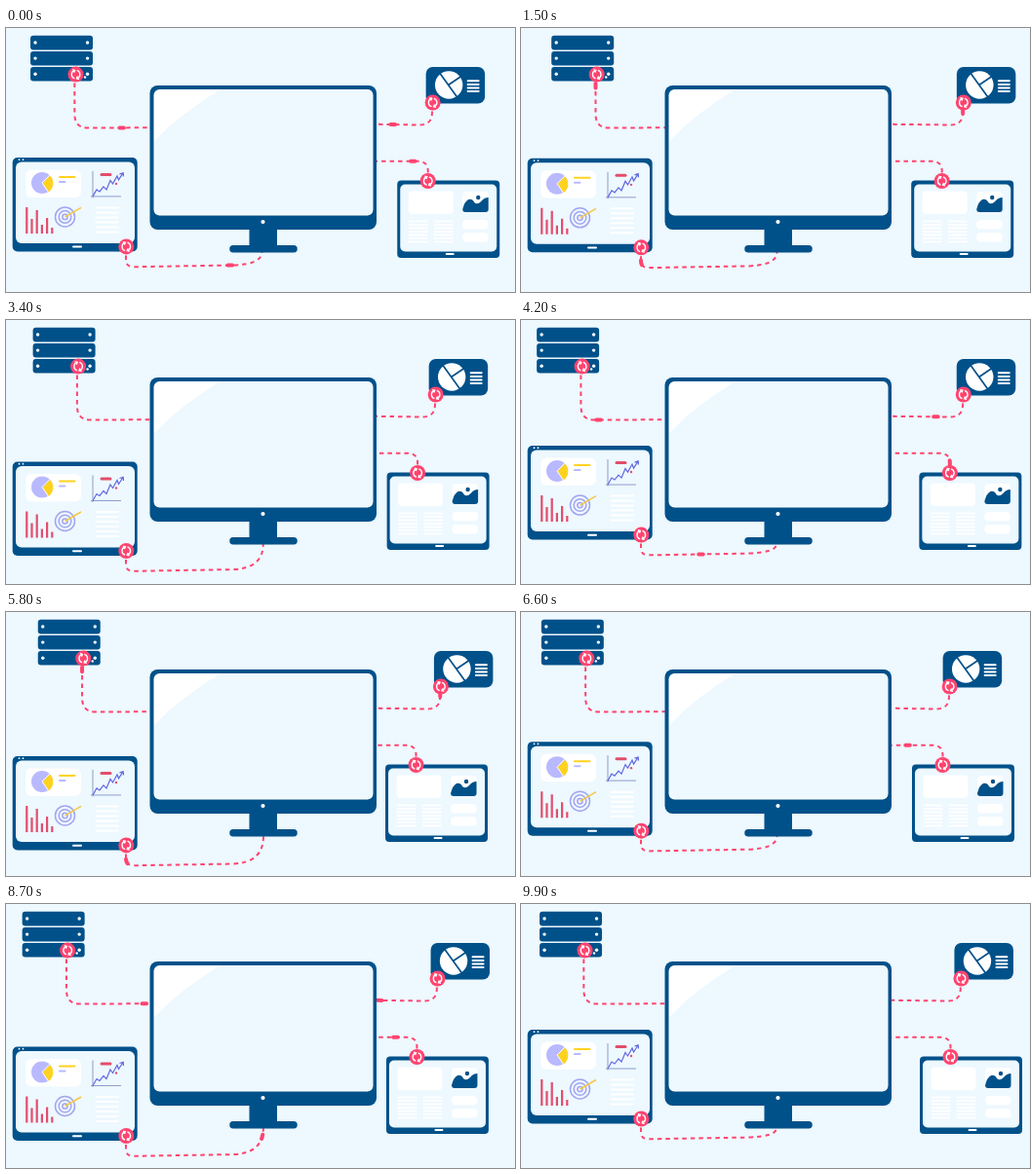
An HTML page for the animation above (10000 ms loop, 522x271 px).

```html
<!DOCTYPE html>
<html lang="en">
<head>
<meta charset="utf-8">
<title>Connected devices</title>
<style>
  html, body { margin: 0; width: 100%; height: 100%; overflow: hidden; background: #edf8ff; }
  svg { display: block; width: 522px; height: 271px; }
  .navy { fill: #00518a; }
  .pale { fill: #edf8ff; }
  .white { fill: #fff; }
  .stroke { fill: none; stroke: #fff; stroke-width: 2; stroke-linecap: round; }
  .wire { fill: none; stroke: #ff4470; stroke-width: 2; stroke-dasharray: 4.5 4; }
  .pulse { fill: none; stroke: #ff4470; stroke-width: 4; stroke-linecap: round; stroke-dasharray: 4.5 999; }
</style>
</head>
<body>
<svg viewBox="0 0 522 271">
  <defs>
    <g id="sync">
      <circle r="8" fill="#ff4470"/>
      <g fill="none" stroke="#fff" stroke-width="1.3">
        <path id="half" d="M-1.2 4.2A4.4 4.4 0 0 1 -1.5 -4.1M-3.4 -4.9L-.9 -4.2L-1.8 -1.9"/>
        <use href="#half" transform="rotate(180)"/>
      </g>
    </g>
  </defs>

  <g id="wires"></g>

  <g id="monitor">
    <rect class="navy" x="147.500" y="59" width="232.500" height="148" rx="8"/>
    <rect class="white" x="151.500" y="63" width="225" height="129.500" rx="6"/>
    <path class="pale" d="M220 63H370Q376 63 376 69V185Q376 191.500 370 191.500H158Q152 191.500 152 186V116Q180 87 220 63Z"/>
    <circle class="white" cx="263.500" cy="199" r="2.100"/>
    <path class="navy" d="M249.500 206H278V223H295A3.700 3.700 0 0 1 295 230.500H233A3.700 3.700 0 0 1 233 223H249.500Z"/>
  </g>

  <g id="server"></g>

  <g id="card">
    <rect class="navy" y="40" width="60.500" height="37.500" rx="7"/>
    <circle class="white" cx="23.500" cy="58.500" r="14.200"/>
    <path d="M14 46L32 71M23 58.500L37 49" fill="none" stroke="#00518a" stroke-width="1.700"/>
    <path class="stroke" d="M43 54.300H54M43 57.900H54M43 61.500H54M43 65.100H54"/>
    <use href="#sync" x="7" y="76.500"/>
  </g>

  <g id="tablet">
    <rect class="navy" y="156.500" width="105" height="79.500" rx="4"/>
    <rect class="pale" x="3" y="160.500" width="99" height="69" rx="5"/>
    <g class="white">
      <rect x="11.500" y="167.500" width="46" height="23.500" rx="4"/>
      <rect x="67" y="197" width="26.500" height="9.500" rx="4"/>
      <rect x="67" y="210" width="26.500" height="9.500" rx="4"/>
    </g>
    <rect class="white" x="67" y="168" width="26.500" height="21" rx="4"/>
    <path class="navy" d="M67 186Q69 178 73 176Q77 175 79 179Q82 182 86 178Q89 174 93.500 174V186Q93.500 189 90.500 189H70Q67 189 67 186Z"/>
    <circle class="navy" cx="83" cy="174" r="2.200"/>
    <path id="tabletText" class="stroke"/>
    <path class="stroke" stroke-width="1.500" d="M50.500 232H57.500"/>
    <use href="#sync" x="31.500" y="157"/>
  </g>

  <g id="laptop">
    <rect class="navy" x="6.700" width="128" height="96.500" rx="5"/>
    <rect class="pale" x="10" y="4.500" width="122" height="83.500" rx="6"/>
    <circle class="white" cx="13.500" cy="2.200" r=".9"/>
    <circle class="white" cx="17.500" cy="2.200" r=".9"/>
    <rect class="white" x="20" y="12.500" width="57" height="28.500" rx="6"/>
    <circle cx="37" cy="26" r="11" fill="#b9b9ff"/>
    <path d="M37.500 26.500L45 18.500A11 11 0 0 1 43.500 35.500Z" fill="#ffd21f"/>
    <path d="M37 26L45 18M37 26L43.500 35.500" stroke="#fff" stroke-width="1"/>
    <path d="M55 20H70.500" stroke="#ffd21f" stroke-width="2" stroke-linecap="round"/>
    <path d="M55 25H60.500" stroke="#b9b9ff" stroke-width="2" stroke-linecap="round"/>
    <path d="M89 14V41.500M87 40H118" fill="none" stroke="#8c9dcc" stroke-width="1"/>
    <path d="M89 40L93 33L96 35L100 30L103 33L107 23.500L109.500 27L114 19L115.500 23L120 16M116.500 17L120.200 15.800L120.500 19.500" fill="none" stroke="#6268e0" stroke-width="1.200"/>
    <path d="M98 17.500H107" stroke="#e34d6d" stroke-width="3" stroke-linecap="round"/>
    <circle cx="113" cy="27" r="1.200" fill="#e34d6d"/>
    <path id="bars" fill="none" stroke="#e34d6d" stroke-width="2.200"/>
    <g fill="none" stroke="#a3a5f0" stroke-width="1.500">
      <circle cx="60.500" cy="61" r="10"/>
      <circle cx="60.500" cy="61" r="6.300"/>
      <circle cx="60.500" cy="61" r="2.600"/>
    </g>
    <path d="M60.500 61L77 51.500" stroke="#f5c842" stroke-width="1.500"/>
    <path id="laptopText" class="stroke"/>
    <path class="stroke" d="M69 91.700H77"/>
    <use href="#sync" x="123.300" y="91.500"/>
  </g>
</svg>
<script>
  const LOOP = 10, STEP = 0.1;
  const $ = id => document.getElementById(id);
  const wave = p => (1 - Math.cos(Math.PI * p)) / 2;

  function add(parent, tag, attrs) {
    const el = document.createElementNS('http://www.w3.org/2000/svg', tag);
    for (const name in attrs) el.setAttribute(name, attrs[name]);
    return parent.appendChild(el);
  }

  function textLines(x, width, top, gap, count) {
    return Array.from({ length: count }, (_, i) => `M${x} ${top + i * gap}h${width}`).join('');
  }

  for (let row = 0; row < 3; row++) {
    const y = 7.8 + row * 16.1;
    add($('server'), 'rect', { class: 'navy', y, width: 64, height: 14.6, rx: 3 });
    for (const cx of [5, 58.5]) add($('server'), 'circle', { class: 'white', cx, cy: y + 7.2, r: 1.7 });
  }
  add($('server'), 'circle', { class: 'white', cx: 56, cy: 50.5, r: 1.2 });
  add($('server'), 'use', { href: '#sync', x: 46.5, y: 47.6 });

  $('bars').setAttribute('d', [27, 15, 24, 9, 16, 6].map((h, i) => `M${21.3 + i * 5.2} 78v${-h}`).join(''));
  $('laptopText').setAttribute('d', textLines(92.5, 22.5, 51.5, 5, 6));
  $('tabletText').setAttribute('d', textLines(12.5, 18, 198.5, 3.5, 7) + textLines(38.5, 18, 198.5, 3.5, 7));

  const wires = {};
  for (const name of ['server', 'card', 'tablet', 'laptop']) {
    wires[name] = {
      line: add($('wires'), 'path', { class: 'wire' }),
      pulse: add($('wires'), 'path', { class: 'pulse' })
    };
  }

  function lerpKeys(keys, t) {
    for (let i = 1; i < keys.length; i++) {
      const [t0, v0] = keys[i - 1], [t1, v1] = keys[i];
      if (t >= t0 && t <= t1) return v0 + (v1 - v0) * (t - t0) / (t1 - t0);
    }
    return null;
  }

  // Swings between 0 and 1, turning at each listed time.
  function swing(turns, t) {
    const i = turns.findIndex((turn, k) => t >= turn && t < turns[k + 1]);
    const p = wave((t - turns[i]) / (turns[i + 1] - turns[i]));
    return i % 2 ? 1 - p : p;
  }

  const CARD_TURNS = [-0.2, 1.4, 3, 4.3, 7.4, 10.75];
  const DIPS = [0.77, 3.14, 5.84, 8.5];
  const DIP_WIDTH = 1.1;
  const PULSE_PERIOD = 2.15;
  const PULSE = [[0, 0], [.22, .09], [.6, .3], [.77, .49], [.87, .76], [1, 1]];
  const TABLET_PULSE = [[.72, 0], [.77, .13], [.87, .45], [1.1, .9], [2.05, .97]];

  function dip(t) {
    const gap = Math.min(...DIPS.map(d => Math.abs(t - d)));
    return gap < DIP_WIDTH ? wave(1 - gap / DIP_WIDTH) : 0;
  }

  function setWire(name, d, keys, phase) {
    const { line, pulse } = wires[name];
    line.setAttribute('d', d);
    pulse.setAttribute('d', d);
    const at = lerpKeys(keys, phase);
    pulse.style.visibility = at === null ? 'hidden' : 'visible';
    if (at !== null) pulse.style.strokeDashoffset = 2 - at * line.getTotalLength();
  }

  const move = (name, x, y = 0) => $(name).setAttribute('transform', `translate(${x} ${y})`);

  function draw(t) {
    const sink = dip(t);
    const serverX = 16 + 17 * wave(2 * (t - 4.17) / 1.115);
    const cardX = 430 + 17 * swing(CARD_TURNS, t);
    const tabletX = 409 - 20 * sink ** 0.6;
    const laptopY = 129 + 19 * sink;
    const phase = (t + 0.87) % PULSE_PERIOD;

    move('server', serverX);
    move('card', cardX);
    move('tablet', tabletX);
    move('laptop', 0, laptopY);

    const sx = serverX + 45.3, cx = cardX + 6.3, tx = tabletX + 31.5;
    const low = laptopY + 112.3, endX = 262 + 2 * sink;
    setWire('server', `M${sx} 48V88Q${sx} 102.500 ${sx + 13} 102.500L149 102.300`, PULSE, phase);
    setWire('card', `M${cx} 77V87Q${cx} 99.500 ${cx - 13} 99.500L379 98.800`, PULSE, phase);
    setWire('tablet', `M${tx} 157V147Q${tx} 136.800 ${tx - 10} 136.800H379`, TABLET_PULSE, phase);
    setWire('laptop', `M123 ${laptopY + 92}V${low - 7}Q123 ${low} 131 ${low}L232 ${low - 1.7}Q${endX} ${low - 2.5} ${endX} 230`, PULSE, phase);
  }

  function frame() {
    const t = performance.now() / 1000 % LOOP;
    draw(Math.floor(t / STEP + 1e-6) * STEP);
    requestAnimationFrame(frame);
  }
  frame();
</script>
</body>
</html>
```
